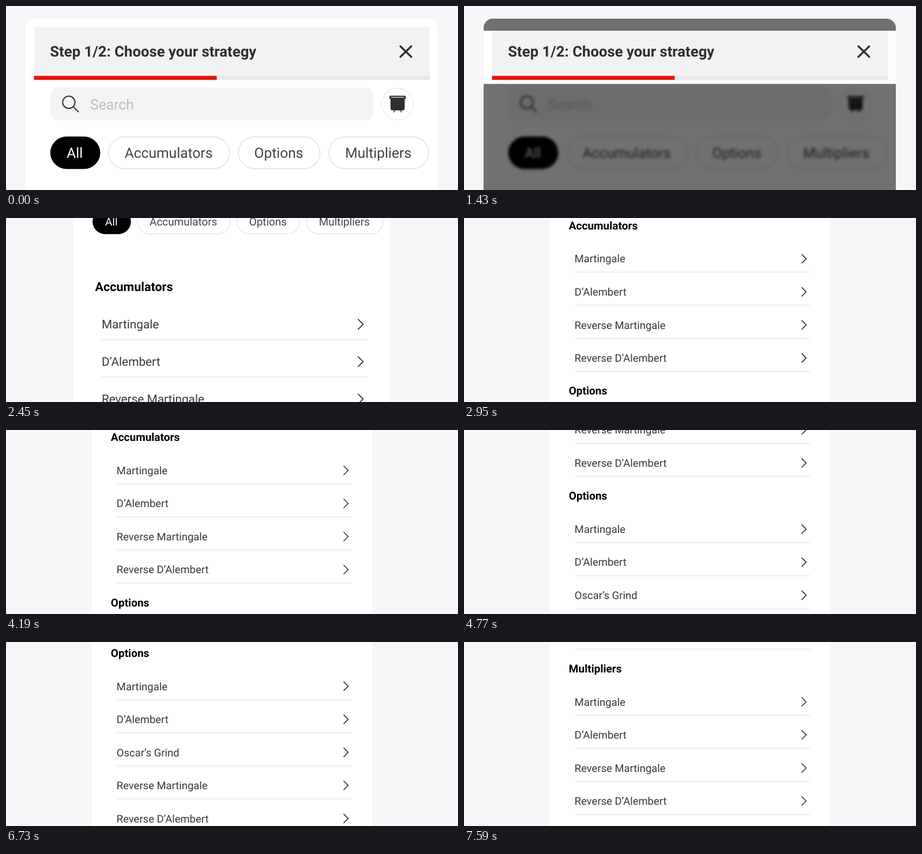
An HTML page that plays this animation: 784 px wide and 320 px high, repeating every 8 s.

```html
<!DOCTYPE html>
<html lang="en">
<head>
<meta charset="utf-8">
<title>Choose your strategy</title>
<style>
  html, body { margin: 0; width: 100%; height: 100%; overflow: hidden; background: #f6f6f8; }
  svg { display: block; width: 784px; height: 320px; }
  text { font-family: Roboto, "Liberation Sans", sans-serif; text-rendering: geometricPrecision; }
  .title { font-size: 25.7px; font-weight: 700; fill: #2f2f31; }
  .chip { font-size: 24.6px; fill: #444; text-anchor: middle; }
  .head { font-size: 28px; font-weight: 700; fill: #000; }
  .row { font-size: 27.1px; fill: #383838; }
  .line { fill: none; stroke-linecap: round; stroke-linejoin: round; }
</style>
</head>
<body>
<svg viewBox="0 0 784 320">
  <defs>
    <filter id="blur" filterUnits="userSpaceOnUse" x="0" y="0" width="784" height="340" color-interpolation-filters="sRGB">
      <feGaussianBlur stdDeviation="2.5"/>
    </filter>
    <clipPath id="shade">
      <path d="M34 43V38a16 16 0 0 1 16-16H733a16 16 0 0 1 16 16V43ZM34 135.4H749V330H34Z"/>
    </clipPath>
  </defs>
  <rect width="784" height="320" fill="#f6f6f8"/>
  <g id="page">
    <rect x="34" y="22" width="715" height="2400" rx="16" fill="#fff"/>
    <g id="top">
      <rect x="49" y="37" width="686" height="86" rx="2" fill="#f2f2f4"/>
      <rect x="49" y="121.5" width="686.5" height="7" rx="2.5" fill="#e8e8ea"/>
      <rect x="48.5" y="121.5" width="317" height="7" fill="#e5140d"/>
      <text class="title" x="76.3" y="88">Step 1/2: Choose your strategy</text>
      <path class="line" d="M684 70l19 18.500M703 70l-19 18.500" stroke="#2f2f31" stroke-width="3.200"/>
    </g>
    <g id="tools">
      <rect x="77" y="142" width="560" height="56.500" rx="14" fill="#f4f4f6"/>
      <g class="line" stroke="#333" stroke-width="2">
        <circle cx="109" cy="167.500" r="10.700"/>
        <path d="M117 175.500l8.500 8.500"/>
      </g>
      <text x="146" y="179.700" font-size="24.700" fill="#bdbdbf">Search</text>
      <circle cx="679" cy="170.500" r="27.500" fill="#fff" stroke="#ececee" stroke-width="1.500"/>
      <rect x="665" y="156" width="28.500" height="6" rx="2" fill="#2f2f31"/>
      <path d="M668 158.700h22.500" stroke="#fff" stroke-width="1.200"/>
      <path d="M667 161.500h24.500v16.500a3.500 3.500 0 0 1-3.500 3.500h-17.500a3.500 3.500 0 0 1-3.500-3.500z" fill="#2f2f31"/>
      <path class="line" d="M674.500 181l-1.800 3.500M684 181l1.800 3.500" stroke="#2f2f31" stroke-width="1.600"/>
    </g>
    <g id="chips"></g>
    <g id="list"></g>
  </g>
  <g id="veil" clip-path="url(#shade)">
    <g filter="url(#blur)">
      <rect x="20" y="10" width="744" height="340" fill="#fff"/>
      <use href="#tools"/>
      <use href="#chips"/>
    </g>
    <rect width="784" height="340" fill="#000" opacity=".56"/>
  </g>
</svg>
<script>
const LOOP = 8000, PITCH = 84.56, MID = 391.7, SMALL = 0.68;
const $ = id => document.getElementById(id);

function add(parent, tag, attrs, text) {
  const el = document.createElementNS('http://www.w3.org/2000/svg', tag);
  for (const key in attrs) el.setAttribute(key, attrs[key]);
  if (text) el.textContent = text;
  parent.appendChild(el);
}

const chips = [['All', 77.3, 163], ['Accumulators', 178, 387.7], ['Options', 403, 544.6], ['Multipliers', 560, 733]];
chips.forEach(([label, left, right], i) => {
  const on = i === 0;
  add($('chips'), 'rect', {
    x: left, y: 227.5, width: right - left, height: 55.5, rx: 27.75,
    fill: on ? '#000' : '#fff', stroke: on ? '#000' : '#e6e6e8', 'stroke-width': on ? 1 : 1.8
  });
  add($('chips'), 'text', {
    class: 'chip', x: (left + right) / 2 - 0.8, y: 264.2, style: on ? 'fill:#fff' : ''
  }, label);
});

const basic = ['Martingale', 'D’Alembert', 'Reverse Martingale', 'Reverse D’Alembert'];
const sections = [
  ['Accumulators', basic],
  ['Options', [...basic.slice(0, 2), 'Oscar’s Grind', ...basic.slice(2)]],
  ['Multipliers', basic]
];
let y = 403.2;
for (const [name, rows] of sections) {
  add($('list'), 'text', { class: 'head', x: 82.6, y: y + 9.6 }, name);
  for (const row of rows) {
    y += PITCH;
    add($('list'), 'text', { class: 'row', x: 97.3, y: y + 9.8 }, row);
    add($('list'), 'path', {
      class: 'line', d: `M677 ${y - 11}l11 11l-11 11`, stroke: '#333', 'stroke-width': 2.3
    });
    add($('list'), 'rect', { x: 97.6, y: y + 32.5, width: 600, height: 4, fill: '#f1f1f3' });
  }
  y += PITCH;
}

const clamp = v => Math.min(1, Math.max(0, v));

function fade(t, from, to) {
  const v = clamp((t - from) / (to - from));
  return v * v * (3 - 2 * v);
}

// Exponential ease in and out
function glide(t, from) {
  const v = clamp((t - from) / 1200);
  if (v === 0 || v === 1) return v;
  return v < 0.5 ? 2 ** (20 * v - 10) / 2 : 1 - 2 ** (10 - 20 * v) / 2;
}

function draw(t) {
  const veil = fade(t, 335, 565) - fade(t, 1420, 1640);
  $('veil').style.display = veil > 0 ? '' : 'none';
  $('veil').setAttribute('opacity', veil);

  const zoom = glide(t, 1799);
  const scale = 1 - (1 - SMALL) * zoom;
  const dx = MID + 0.3 * zoom - MID * scale;
  const dy = -261.2 * zoom - 271 * glide(t, 4131) - 328 * glide(t, 6372);
  $('page').setAttribute('transform', `translate(${dx} ${dy}) scale(${scale})`);
}

const start = performance.now();
function tick() {
  draw((performance.now() - start) % LOOP);
  requestAnimationFrame(tick);
}
tick();
</script>
</body>
</html>
```
